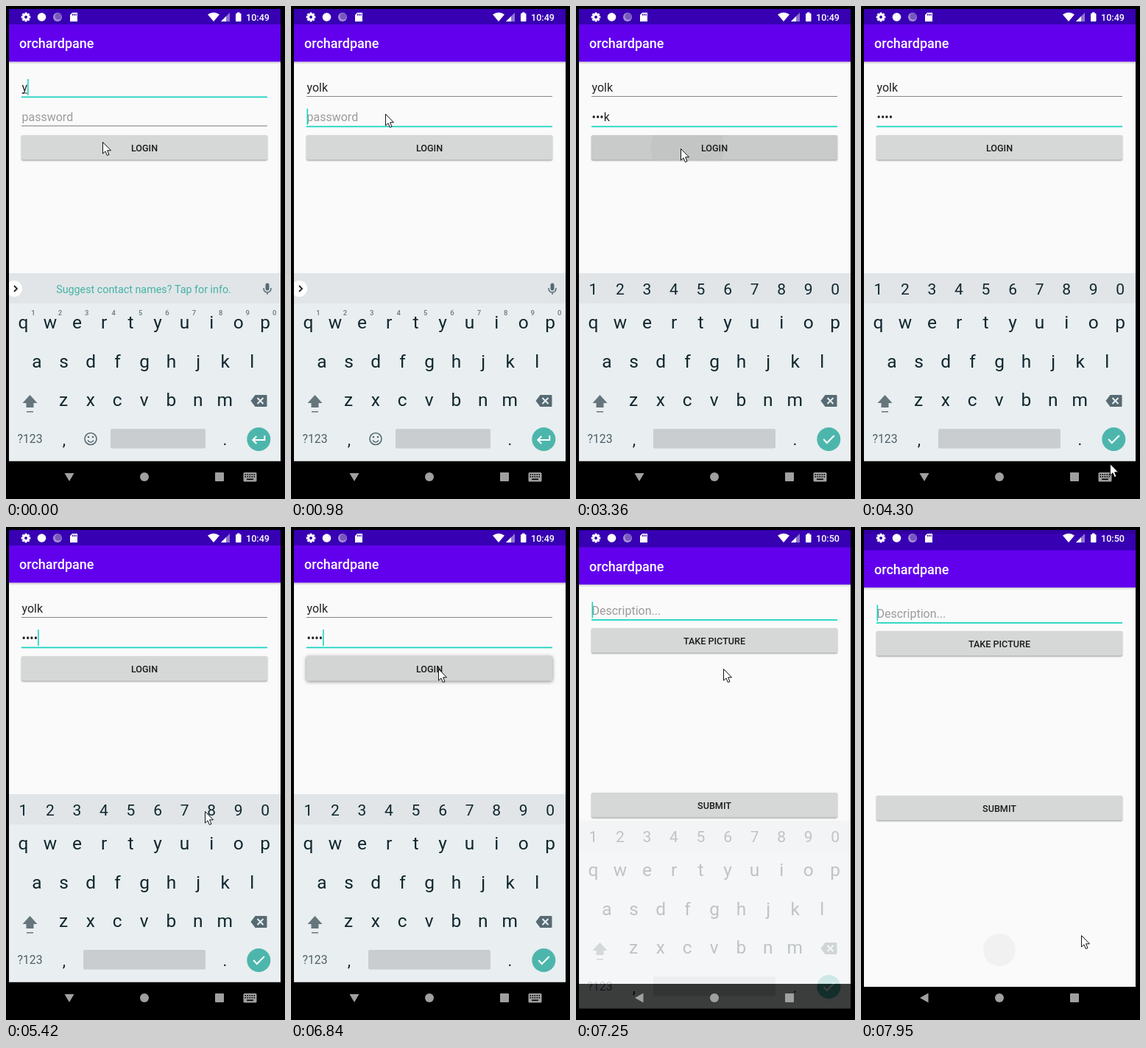
An HTML page with a canvas that plays this animation: 379x668 px, repeating every 8 s.

```html
<!DOCTYPE html>
<html lang="en">
<head>
<meta charset="utf-8">
<title>Login demo</title>
<style>
html, body { margin: 0; width: 379px; height: 668px; overflow: hidden; background: #000 }
canvas { display: block }
</style>
</head>
<body>
<canvas id="stage" width="379" height="668"></canvas>
<script>
const stage = document.getElementById('stage');
const layer = stage.cloneNode();
const stageContext = stage.getContext('2d'), layerContext = layer.getContext('2d');
let c = stageContext;
const LOOP = 8000, APP = 'orchardpane', USER = 'yolk';
const TEAL = '#1ad3c0', KEY = '#10272e', ICON = '#566a73';
const BAR_END = 75.5, NAV_TOP = 616.5;

// Stepped timelines: each row is [start time, ...values].
const pointer = [
  [0, 131, 184], [710, 130, 172], [840, 129, 153], [980, 128, 146],
  [2790, 130, 156], [2930, 138, 180], [3070, 142, 193], [3620, 220, 320], [3760, 300, 447],
  [3910, 345, 560], [4050, 353, 648], [4190, 338, 620], [4430, 318, 590],
  [5270, 303, 510], [5420, 270, 385], [5550, 235, 275], [5680, 207, 208], [5840, 200, 192],
  [7680, 225, 290], [7810, 275, 470], [7950, 299, 553]
];
const keyboardExit = [[0, 0, 1], [7110, 10, .8], [7250, 36, .25], [7400, 0, 0]];
const entries = [[7110, 18, 220], [7250, 2.5, 0], [7400, 0, 0]];
const secondEntry = [[7810, 24, 220], [7950, 6.5, 0]];
const caretToggles = [1690, 2100, 3070, 3490, 3910, 4430, 4990, 5420, 5980, 6410];
const at = (rows, t) => rows.filter(r => r[0] <= t).pop();
const passed = (times, t) => times.filter(s => s <= t).length;

function rect(x, y, w, h, color, r = 0) {
  c.fillStyle = color;
  c.beginPath();
  c.roundRect(x, y, w, h, r);
  c.fill();
}
function disc(x, y, r, color) {
  c.fillStyle = color;
  c.beginPath();
  c.arc(x, y, r, 0, 7);
  c.fill();
}
function text(s, x, y, size, color, align = 'left', weight = 400) {
  c.font = `${weight} ${size}px Roboto, sans-serif`;
  c.textAlign = align;
  c.fillStyle = color;
  c.fillText(s, x, y);
}
function shape(d, x, y, fill, stroke, width = 1) {
  const p = new Path2D(d);
  c.save();
  c.translate(x, y);
  if (fill) { c.fillStyle = fill; c.fill(p); }
  if (stroke) { c.strokeStyle = stroke; c.lineWidth = width; c.stroke(p); }
  c.restore();
}

function button(label, y, fill = '#d6d7d7', raised = false) {
  c.save();
  c.shadowColor = raised ? '#0007' : '#0006';
  c.shadowBlur = raised ? 5 : 2;
  c.shadowOffsetY = 1;
  rect(21, y, 334, 33.5, fill, 2);
  c.restore();
  return () => text(label, 188, y + 21.5, 12.6, '#1b1b1b', 'center', 500);
}
function field(value, hint, y, focused, caret) {
  text(value || hint, 21.5, y - 7, 16, value ? '#242424' : '#9b9b9b');
  if (focused) rect(21, y - .6, 334, 1.8, TEAL);
  else rect(21, y - 1, 334, 1, '#858585');
  c.font = '400 16px Roboto, sans-serif';
  if (caret) rect(21.5 + (value ? c.measureText(value).width : 0), y - 24, 1.6, 22, TEAL);
}
function frameBars() {
  rect(4, BAR_END, 369, 2, '#0002');
  rect(4, BAR_END + 2, 369, 1, '#0000000c');
  rect(4, 4, 369, BAR_END - 4, '#6200ee');
  rect(4, 4, 369, 21, '#3700b3');
  text(APP, 18, 57, 18, '#fff', 'left', 500);
  rect(4, NAV_TOP, 369, 60, '#000');
}

function loginScreen(t) {
  rect(4, 4, 369, 613, '#fafafa');
  frameBars();
  const onPassword = t >= 980;
  const blink = passed(caretToggles, t) % 2 === 0;
  const name = USER.slice(0, 1 + passed([150, 280, 410], t));
  field(name, '', 123, !onPassword, !onPassword);
  if (!onPassword) rect(21.5, 117.5, c.measureText(name).width, 1, '#333');

  const n = passed([2100, 2240, 2380, 2520], t);
  const secret = t >= 4050 ? '••••' : n ? '•'.repeat(n - 1) + USER[n - 1] : '';
  field(secret, 'password', 163, onPassword, onPassword && blink);

  const pressed = t >= 3210 && t < 3490, held = t >= 6840;
  const label = button('LOGIN', 175, pressed ? '#c9caca' : held ? '#d3d4d4' : '#d6d7d7', held);
  if (pressed) {
    c.save();
    c.beginPath();
    c.rect(21, 175, 334, 33.5);
    c.clip();
    disc(151.5, 192, t < 3360 ? 24 : 50, '#c3c4c4');
    c.restore();
  }
  label();
}

function postScreen(offset, clipTop) {
  // The dimmed status bar of the screen behind shows above the entering one.
  if (!clipTop) rect(4, 4, 369, 21, '#3200a1');
  c.save();
  c.beginPath();
  c.rect(4, 4 + clipTop, 369, 664);
  c.clip();
  c.translate(0, offset);
  rect(4, 30, 369, 587, '#fafafa');
  frameBars();
  field('', 'Description...', 123, true, true);
  button('TAKE PICTURE', 134.5)();
  button('SUBMIT', 357.5)();
  c.restore();
}

function keyboard(numeric) {
  rect(4, 362, 369, NAV_TOP - 362, '#e9eef0');
  rect(4, 362, 369, 41, '#e1e5e8');
  [...'1234567890'].forEach((d, i) => {
    if (numeric) text(d, 23.3 + 36.55 * i, 391, 21, KEY, 'center');
    else text(d, 37 + 36.4 * i, 419, 9.5, '#6c777c', 'center', 500);
  });
  [['qwertyuiop', 23.5], ['asdfghjkl', 42], ['zxcvbnm', 78.2]].forEach(([keys, x], row) =>
    [...keys].forEach((k, i) => text(k, x + 36.52 * i, 437 + 52.7 * row, 24.5, KEY, 'center')));

  shape('M0-9 L10 2 H5 V8 H-5 V2 H-10Z', 32.5, 536, '#66757c');
  rect(28, 549, 9, 1.5, '#66757c');
  shape('M-11 0 L-5-8 H10 Q11-8 11-7 V7 Q11 8 10 8 H-5Z', 343.5, 535, ICON);
  shape('M-2-4 L6 4 M6-4 L-2 4', 343.5, 535, null, '#e9eef0', 2);
  text('?123', 15.5, 592, 15.8, '#4d6069');
  text(',', 79, 595, 22, KEY, 'center');
  text('.', 297.5, 595, 22, KEY, 'center');
  rect(numeric ? 105 : 142, 573, numeric ? 166 : 129, 26.5, '#c9cdd0', 2);
  disc(343.3, 587, 16, '#4db6ac');
  if (numeric) {
    shape('M-7 0 L-2.5 5 L7.5-5', 343.3, 587, null, '#fff', 2);
    return;
  }
  shape('M8-5 V1 H-7 M-3-4 L-8 1 L-3 6', 343.3, 587, null, '#fff', 2);
  shape('M8 0 A8 8 0 1 1-8 0 A8 8 0 1 1 8 0 M-4 2 Q0 7 4 2', 115, 586.5, null, ICON, 1.6);
  disc(112, 584, 1.3, ICON);
  disc(118, 584, 1.3, ICON);
}
function suggestionStrip(t) {
  c.save();
  c.beginPath();
  c.rect(4, 362, 369, 41);
  c.clip();
  disc(11, 383, 11, '#fff');
  shape('M-2-4 L2 0 L-2 4', 13, 383, null, '#222', 1.8);
  c.restore();
  if (t < 150) text('Suggest contact names? Tap for info.', 187, 389, 14.3, '#43b3a5', 'center');
  rect(352.5, 375.5, 5, 10, ICON, 2.5);
  shape('M-5-1 Q-5 5 0 5 Q5 5 5-1 M0 5 V8', 355, 383, null, ICON, 1.5);
}
// Drawn on its own layer so that it fades as one piece.
function slidingKeyboard(t) {
  const [, slide, alpha] = at(keyboardExit, t);
  if (!alpha) return;
  c = layerContext;
  c.clearRect(0, 0, 379, 668);
  keyboard(t >= 1110);
  if (t < 1110) suggestionStrip(t);
  c = stageContext;
  c.globalAlpha = alpha;
  c.drawImage(layer, 0, slide);
  c.globalAlpha = 1;
}

function statusIcons(clock) {
  for (let i = 0; i < 8; i++) {
    c.save();
    c.translate(27, 15);
    c.rotate(i * Math.PI / 4);
    rect(-1.5, -6.3, 3, 4, '#fff');
    c.restore();
  }
  shape('M4.8 0 A4.8 4.8 0 1 1-4.8 0 A4.8 4.8 0 1 1 4.8 0 M2 0 A2 2 0 1 0-2 0 A2 2 0 1 0 2 0', 27, 15, '#fff');
  disc(48.5, 15, 5.8, '#fff');
  disc(70, 15, 6, '#a78fd8');
  disc(71, 14, 4.6, '#7958bd');
  shape('M-5-3 L-2-6 H5 V6 H-5Z', 92, 15, '#fff');
  for (let i = 0; i < 3; i++) rect(90 + i * 2.3, 10.5, 1.2, 2.5, '#3700b3');
  shape('M-8-3.5 Q0-9 8-3.5 L0 6Z', 282, 15, '#fff');
  shape('M6-6 V6 H-6Z', 298, 15, '#8f75cf');
  shape('M1-1 V6 H-6Z', 298, 15, '#fff');
  rect(312, 10, 7.5, 11, '#fff', 1);
  rect(314, 8.5, 3.5, 2, '#fff');
  text(clock, 326, 19.5, 12.6, '#fff', 'left', 500);
}
function navIcons(keyboardOpen) {
  const gray = '#a0a0a0';
  shape(keyboardOpen ? 'M-6.5-5 H6.5 L0 6Z' : 'M5.5-6.5 V6.5 L-6 0Z', 86, 638, gray);
  disc(188, 638, 6, gray);
  rect(284, 632, 12, 12, gray, 1);
  if (!keyboardOpen) return;
  rect(322.5, 632, 18, 12.5, gray, 1.5);
  for (let i = 0; i < 10; i++) rect(324.5 + i % 5 * 3, 634 + (i > 4) * 3, 1.6, 1.6, '#000');
  rect(327, 640.5, 9, 1.6, '#000');
}

function draw(t) {
  rect(0, 0, 379, 668, '#000');
  loginScreen(t);
  for (const list of [entries, secondEntry]) {
    const step = at(list, t);
    if (step) postScreen(step[1], step[2]);
  }
  if (t >= 7950) disc(188, 573, 22, '#f1f1f1');
  slidingKeyboard(t);
  statusIcons(t < 7110 ? '10:49' : '10:50');
  navIcons(t < 7110);

  const [, x, y] = at(pointer, t);
  shape('M.5.5 V16 L4 12.8 L6.4 18.5 L9 17.4 L6.6 11.8 H11.5Z', x, y, '#fff', '#111', 1);
}

const start = performance.now();
(function tick() {
  draw((performance.now() - start) % LOOP);
  requestAnimationFrame(tick);
})();
</script>
</body>
</html>
```
